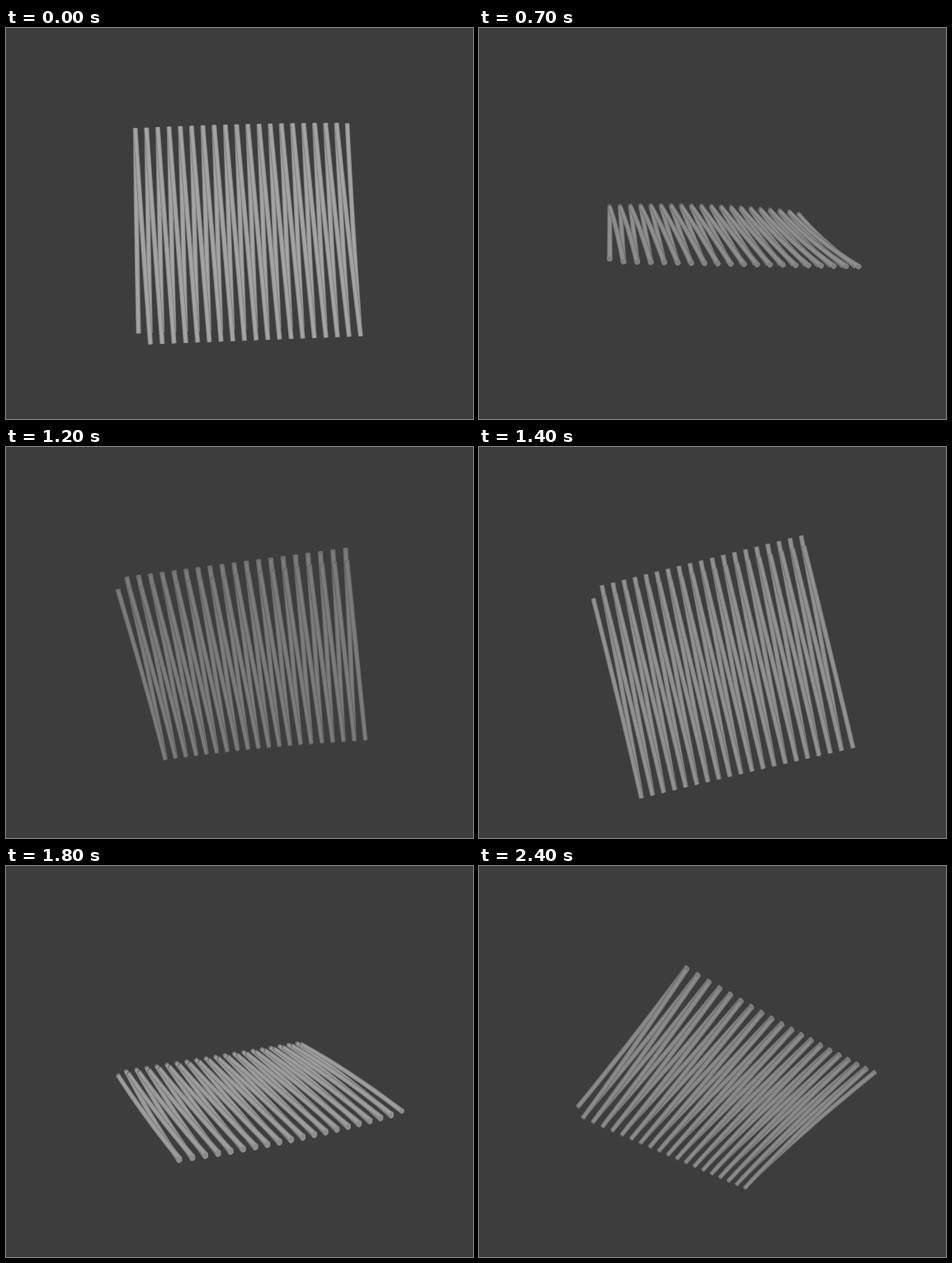
An HTML page with a canvas for the animation above (3 s loop, 566 by 474 pixels).

```html
<!DOCTYPE html>
<html lang="en">
<head>
<meta charset="utf-8">
<title>Turning rods</title>
<style>
  html, body { margin: 0; width: 100%; height: 100%; overflow: hidden; background: #3d3d3d; }
  canvas { display: block; }
</style>
</head>
<body>
<canvas id="stage" width="566" height="474"></canvas>
<script>
const ctx = document.getElementById('stage').getContext('2d');
const LOOP = 3000, STEP = 100;
const ROWS = 20, SIZE = 263, RADIUS = 2.95, CAMERA = 900;
const LAYER = 1, BOW = 4, SEGMENTS = 8;

// time, pitch, yaw, skew, centre x, centre y, brightness
const poses = [
  [300,    9,   -2.2, 0.04,  291,   245.6, 164],
  [400,   16.4, -3,   0.05,  291.6, 245.3, 169],
  [700,   75.5, -8.2, 0.065, 291.5, 249.4, 142],
  [1200, 149,    9.4, 0.055, 292.2, 263,   124],
  [1600, 212.6, 17.6, 0.03,  294,   270.6, 166],
  [2000, 279,   28.5, 0.012, 293.5, 273.5, 144],
  [2400, 315.5, 34.4, 0,     292,   275.7, 138]
];

function slope(i, k) {
  if (i === 0 || i === poses.length - 1) return 0;
  const [a, b, c] = [poses[i - 1], poses[i], poses[i + 1]];
  const before = b[0] - a[0], after = c[0] - b[0];
  const s1 = (b[k] - a[k]) / before, s2 = (c[k] - b[k]) / after;
  return s1 * s2 <= 0 ? 0 : (s1 * after + s2 * before) / (before + after);
}

// Cubic Hermite through the poses
function poseAt(time) {
  let i = 0;
  while (i < poses.length - 2 && time >= poses[i + 1][0]) i++;
  const a = poses[i], b = poses[i + 1], span = b[0] - a[0];
  const t = (time - a[0]) / span, t2 = t * t, t3 = t2 * t;
  return [1, 2, 3, 4, 5, 6].map(k =>
    a[k] * (2 * t3 - 3 * t2 + 1) + b[k] * (3 * t2 - 2 * t3) +
    span * (slope(i, k) * (t3 - 2 * t2 + t) + slope(i + 1, k) * (t3 - t2)));
}

function makeProjector(pitch, yaw, skew, cx, cy) {
  const rad = Math.PI / 180;
  const cp = Math.cos(pitch * rad), sp = Math.sin(pitch * rad);
  const cw = Math.cos(yaw * rad), sw = Math.sin(yaw * rad);
  const across = [cw, sw * cp + skew * sp, sw * sp - skew * cp];
  const along = [-sw, cw * cp, cw * sp];
  const normal = [skew * cw, -sp, cp];
  const project = (index, v, layer) => {
    const s = index / (ROWS - 1);
    const bend = 20 * s * (1 - s) * (1 - v) + 4 * BOW * v * (1 - v) * (1 - 2 * s);
    const [x, y, z] = [0, 1, 2].map(k =>
      across[k] * (s - 0.5) * SIZE + along[k] * (v - 0.5) * SIZE + normal[k] * (layer + bend));
    const scale = CAMERA / (CAMERA - z);
    return { x: cx + x * scale, y: cy + y * scale, z, r: RADIUS * scale };
  };
  return { project, facing: normal[2], rowDepth: across[2] };
}

const gray = g => `rgb(${Math.round(g)},${Math.round(g)},${Math.round(g + 1)})`;

function tube(points, width, color) {
  const outline = side => points.map((p, i) => {
    const a = points[Math.max(0, i - 1)], b = points[Math.min(points.length - 1, i + 1)];
    const length = Math.hypot(b.x - a.x, b.y - a.y) || 1;
    const offset = side * width * p.r / length;
    return [p.x - (b.y - a.y) * offset, p.y + (b.x - a.x) * offset];
  });
  ctx.fillStyle = color;
  ctx.beginPath();
  for (const [x, y] of [...outline(1), ...outline(-1).reverse()]) ctx.lineTo(x, y);
  ctx.fill();
}

function cap(p, angle, squash, color) {
  ctx.fillStyle = color;
  ctx.beginPath();
  ctx.ellipse(p.x, p.y, p.r * squash, p.r, angle, 0, 2 * Math.PI);
  ctx.fill();
}

function drawRod(points, light) {
  const first = points[0], last = points[points.length - 1];
  const [far, near] = first.z < last.z ? [first, last] : [last, first];
  const angle = Math.atan2(near.y - far.y, near.x - far.x);
  const squash = Math.max(0.2, Math.abs(near.z - far.z) / SIZE);
  const edge = gray(light * 0.74);
  cap(far, angle, squash, edge);
  tube(points, 1, edge);
  tube(points, 0.78, gray(light * 0.93));
  tube(points, 0.5, gray(light));
  cap(near, angle, squash, gray(light * 0.9));
}

function draw(time) {
  const [pitch, yaw, skew, cx, cy, light] = poseAt(time);
  const { project, facing, rowDepth } = makeProjector(pitch, yaw, skew, cx, cy);
  const order = Array.from({ length: ROWS }, (_, i) => rowDepth > 0 ? i : ROWS - 1 - i);
  const rod = (index, lean, reach, layer) => Array.from({ length: SEGMENTS + 1 }, (_, k) => {
    const t = k / SEGMENTS;
    return project(index + lean * t, reach * t, layer);
  });
  // Straight rods behind, rods leaning to the next place in front
  const layers = [
    i => drawRod(rod(i, 0, 0.95, -LAYER), light),
    i => i < ROWS - 1 && drawRod(rod(i, 1, 1, LAYER), light)
  ];
  if (facing < 0) layers.reverse();
  ctx.fillStyle = '#3d3d3d';
  ctx.fillRect(0, 0, 566, 474);
  for (const layer of layers) order.forEach(layer);
}

function frame() {
  const t = performance.now() % LOOP;
  draw(t < 400 ? 300 : Math.min(2400, Math.floor(t / STEP) * STEP));
  requestAnimationFrame(frame);
}
frame();
</script>
</body>
</html>
```
